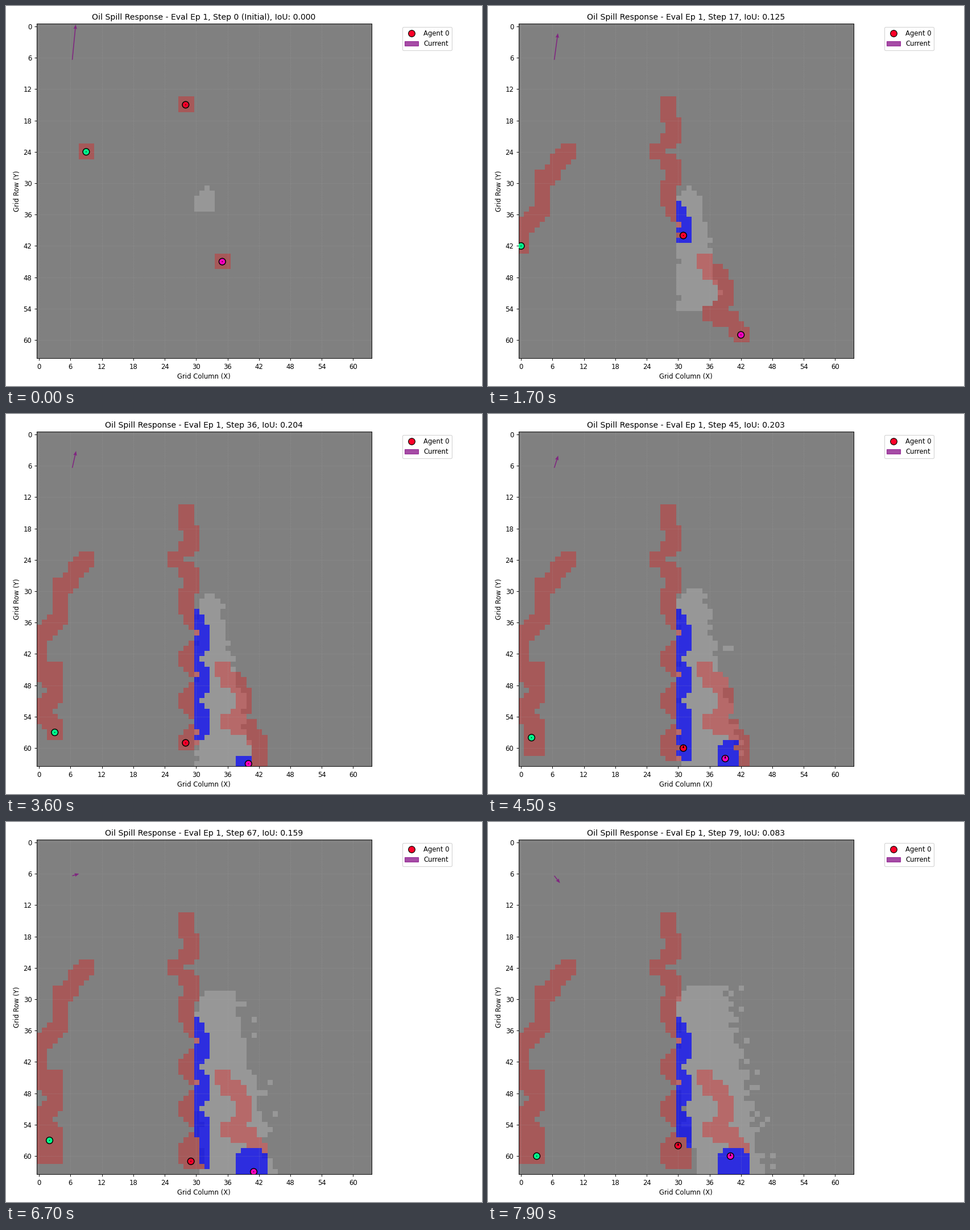
Write a matplotlib script that moves like this. It is 837x669 px and loops after 8000 ms.

```python
import numpy as np
import matplotlib.pyplot as plt
from matplotlib.animation import FuncAnimation
from matplotlib.lines import Line2D
from matplotlib.patches import Patch

W, H, DPI = 837, 669, 83.7
LEFT, BOTTOM, SIDE = 53.5, 620.4, 589.2
N, STEPS = 64, 80
ROWS, COLS = np.arange(N), np.arange(N)[None, :]
STEP = np.arange(STEPS)
LAST = STEPS - 1
TURN = np.pi / 4  # sweeps and patrols repeat every 8 steps


# ---------- agents ----------
def path(*points):
    t, x, y = np.array(points).T
    return np.stack([np.interp(STEP, t, x), np.interp(STEP, t, y)], 1)


def orbit(cx, cy, rx, ry, lag):
    a = TURN * (STEP - 55) - lag
    return np.stack([cx + rx * np.sin(a), cy - ry * np.cos(a)], 1)


def chain(*stages):
    """Join (start step, positions) stages and snap them to the grid."""
    track = np.zeros((STEPS, 2))
    for begin, xy in stages:
        track[begin:] = xy[begin:]
    return np.round(track).astype(int)


red = chain(
    (0, path((0, 28, 15), (2, 29, 19), (3, 29, 21), (5, 26, 24), (7, 29, 27),
             (8, 29, 29), (10, 28, 33), (13, 31, 38), (14, 31, 40))),
    (17, np.stack([31.2 - 3.2 * np.abs(np.cos(TURN / 2 * (STEP - 20))) ** 3,
                   STEP + 23], 1)),
    (37, orbit(29.6, 59.5, -1.8, 1.6, 0.2)))

green = chain(
    (0, path((0, 9, 24), (2, 7, 26), (4, 5, 29), (5, 4, 29), (11, 4, 35),
             (14, 1, 38), (15, 0, 39), (17, 0, 42))),
    (18, np.stack([2 + 1.2 * np.cos(TURN * (STEP - 20)),
                   np.maximum(STEP + 21, 45)], 1)),
    (37, np.stack([2 - 1.2 * np.cos(TURN / 6 * (STEP - 55)),
                   58.5 + 1.6 * np.cos(TURN * (STEP - 55))], 1)))

pink = chain(
    (0, path((0, 35, 45), (1, 36, 47), (3, 37, 47), (5, 39, 50), (8, 39, 52),
             (10, 36, 55), (12, 39, 56), (14, 40, 56), (16, 42, 59),
             (17, 42, 59), (20, 42, 62))),
    (22, np.stack([39.6 + 0.6 * np.cos(TURN * (STEP - 28)),
                   np.full(STEPS, 63)], 1)),
    (37, orbit(40.5, 61.5, 1.6, 1.5, 0.3)))

agents = np.stack([red, green, pink], 1)


def heading(n):
    """Tick along the last move; none while descending."""
    d = np.sign(agents[n] - agents[max(n - 1, 0)])
    up = d[:, 1] < 0
    level = d[:, 1] == 0
    return 0.6 * d[:, 0] * level, -0.6 * up


# ---------- oil ----------
def oil_at(n, rng):
    late = np.clip((n - 36) / 43, 0, 1)
    top = round(31 - 3 * late)
    bottom = 35 + 28.5 * (1 - max(0, 1 - n / 30) ** 1.4)
    alive = ((ROWS >= top) & (ROWS <= bottom))[:, None]

    # leans right with depth, rounded at the crown and at the sinking front
    right = 32.6 + 6.5 * (n / LAST) ** 2 + 6 * (ROWS - 31) / 29
    crown = 32 + 2 * (ROWS - top) + 10 * late
    front = 33 + 1.5 * (bottom - ROWS) + 2 * max(0, n - 28)
    right = np.minimum(right, np.minimum(crown, front))
    wash = 3.5 * late ** 2 * np.clip((ROWS - 46) / 15, 0, 1)
    left = np.maximum(30.1 + wash, 32 - (ROWS - top))

    rough = min(1, n / 17)
    left = np.round(left + rough * rng.uniform(-0.6, 0.6, N))[:, None]
    right = np.round(right + rough * rng.uniform(-0.8, 0.8, N))[:, None]
    body = (COLS >= left) & (COLS <= right)
    drops = (COLS > right) & (COLS < right + 4)
    drops &= rng.random((N, N)) < 0.12 * late
    return alive & (body | drops)


# ---------- mapping ----------
CLEAN, OILY = 1, 2


def blend(img, mask, color, alpha):
    img[mask] = (1 - alpha) * img[mask] + alpha * np.array(color)


def simulate():
    rng = np.random.default_rng(3)
    known = np.zeros((N, N), int)
    images = []
    for n in STEP:
        oil = oil_at(n, rng)
        for x, y in agents[n]:
            box = np.s_[max(y - 1, 0):y + 2, max(x - 1, 0):x + 2]
            known[box] = np.where(oil[box], OILY, CLEAN)
        img = np.full((N, N, 3), 128 / 255)
        img[oil] = 151 / 255
        blend(img, known == CLEAN, (1, 0, 0), 0.3)
        blend(img, known == OILY, (0, 0, 1), 0.7)
        images.append(img)
    return images


images = simulate()
iou = np.interp(STEP, [0, 17, 28, 36, 55, 67, 79],
                [0, .125, .152, .204, .201, .159, .083])
flow_t = [0, 55, 67, 79]
flow_x = np.interp(STEP, flow_t, [0.65, 0.76, 1.3, 1.1])
flow_y = np.interp(STEP, flow_t, [-6.75, -1.35, -0.4, 1.4])

# ---------- figure ----------
plt.rcParams.update({"font.family": "DejaVu Sans", "font.size": 10})
fig = plt.figure(figsize=((W + 1e-6) / DPI, (H + 1e-6) / DPI), dpi=DPI)
ax = fig.add_axes([LEFT / W, 1 - BOTTOM / H, SIDE / W, SIDE / H])
field = ax.imshow(images[0], interpolation="nearest", aspect="auto")
ax.set_xticks(range(0, N, 6))
ax.set_yticks(range(0, N, 6))
ax.grid(True, ls=":", lw=0.6, color="#b0b0b0", alpha=0.5)
ax.set_xlabel("Grid Column (X)")
ax.set_ylabel("Grid Row (Y)")
title = ax.set_title("", fontsize=12)

colors = plt.get_cmap("gist_rainbow")([0.0, 0.5, 1.0])
dots = ax.scatter(*agents[0].T, s=100, c=colors, edgecolors="black",
                  linewidths=1.3, zorder=5)
vectors = dict(angles="xy", scale_units="xy", scale=1)
ticks = ax.quiver(*agents[0].T, [0] * 3, [0] * 3, color="black",
                  width=0.003, zorder=6, **vectors)
flow = ax.quiver([6.35], [6.4], [flow_x[0]], [flow_y[0]], color="purple",
                 alpha=0.7, width=0.0027, headwidth=4, headlength=5,
                 headaxislength=4.5, zorder=4, **vectors)
ax.set_xlim(-0.5, N - 0.5)
ax.set_ylim(N - 0.5, -0.5)
ax.legend(handles=[
    Line2D([], [], ls="", marker="o", ms=10, mfc=colors[0], mec="black",
           label="Agent 0"),
    Patch(color="purple", alpha=0.7, label="Current")],
    loc="upper left", bbox_to_anchor=(1.082, 1))


def draw(n):
    field.set_data(images[n])
    dots.set_offsets(agents[n])
    ticks.set_offsets(agents[n])
    ticks.XY = agents[n].astype(float)
    ticks.set_UVC(*heading(n))
    flow.set_UVC([flow_x[n]], [flow_y[n]])
    label = "0 (Initial)" if n == 0 else str(n)
    title.set_text(f"Oil Spill Response - Eval Ep 1, Step {label}, IoU: {iou[n]:.3f}")
    return field, dots, ticks, flow, title


anim = FuncAnimation(fig, draw, frames=STEPS, interval=100, repeat=True,
                     repeat_delay=0, blit=False)
plt.show()
```
